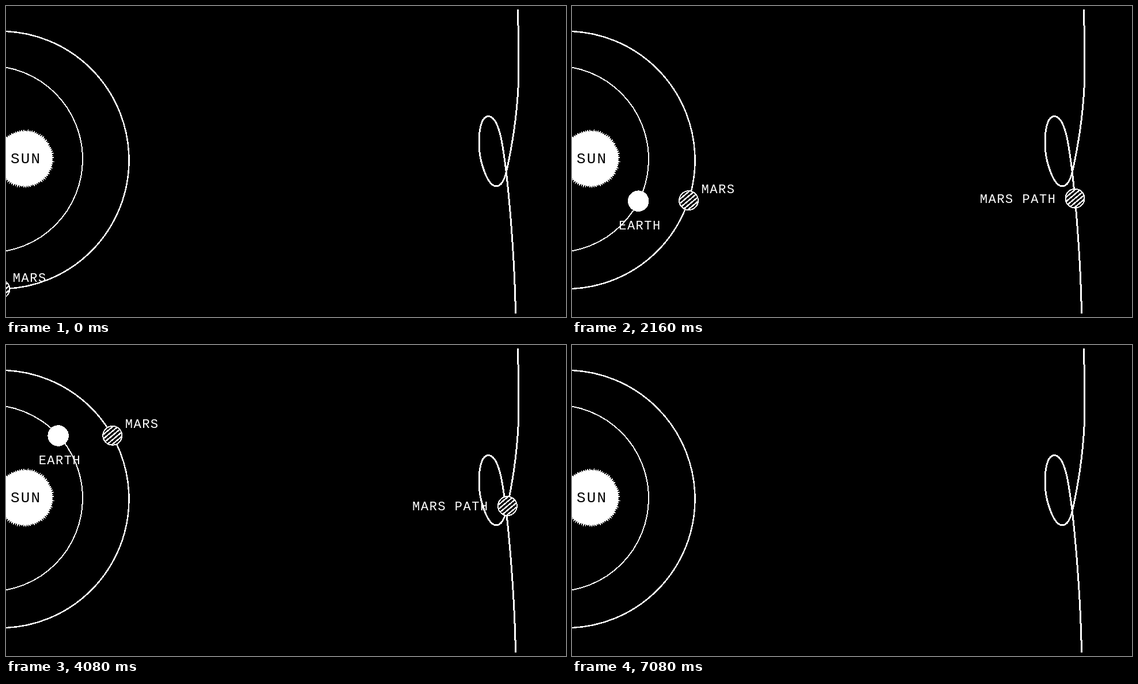
Write an HTML page that moves like this. It is 972 by 540 pixels and loops after 7.32 s.

```html
<!DOCTYPE html>
<html lang="en">
<head>
<meta charset="utf-8">
<title>Retrograde motion</title>
<style>
  html, body { margin: 0; width: 100%; height: 100%; overflow: hidden; background: #000; }
  svg { display: block; width: 972px; height: 540px; shape-rendering: crispEdges; }
  .line { fill: none; stroke: #fff; }
  text { font: 22px "Liberation Mono", monospace; letter-spacing: 1.5px; fill: #fff; }
  .sun-label { font-size: 26px; letter-spacing: 2.2px; fill: #000; }
</style>
</head>
<body>
<svg viewBox="0 0 972 540">
  <defs>
    <g id="hatched">
      <circle r="16.5" fill="#000" stroke="#fff" stroke-width="2"/>
      <path id="hatching" class="line" stroke-width="2.5"/>
    </g>
  </defs>

  <circle class="line" cx="-10.2" cy="267.5" r="223.7" stroke-width="2.5"/>
  <circle class="line" cx="-29" cy="266" r="162" stroke-width="2"/>
  <path id="track" class="line" stroke-width="3" d="M884.5 534 C883.5 470 878 375 868.5 290
    C863 247 857 191.5 837 191.5 C828 191.5 821 206 821 238 C821 270 836 313 851 313
    C858 313 865 306 870 281 C881 230 890 165 890 105 Q890 50 888 6"/>

  <polygon id="sun" fill="#fff"/>
  <text class="sun-label" x="8" y="273">SUN</text>

  <g id="earth">
    <circle r="18.3" fill="#fff"/>
    <text x="-34" y="49">EARTH</text>
  </g>
  <g id="mars">
    <use href="#hatched"/>
    <text x="22" y="-13">MARS</text>
  </g>
  <g id="apparent">
    <use href="#hatched"/>
    <text x="-165" y="7.5">MARS PATH</text>
  </g>
</svg>
<script>
const LOOP = 7320, STEP = 60, LAST = 7080;
const get = id => document.getElementById(id);
const track = get('track');
const trackLength = track.getTotalLength();

// Orbits: centre, radius and [time, angle in degrees] keys
const marsOrbit = {
  cx: -10.2, cy: 267.5, r: 224,
  keys: [[0, 90], [1300, 40], [1440, 36.4], [2880, 0.1], [4080, -29.5], [6240, -81.8], [7020, -108]]
};
const earthOrbit = {
  cx: -29, cy: 266, r: 161.5,
  keys: [[780, 72.4], [1440, 52.1], [2880, 1.4], [3900, -35.2], [4080, -42.2], [5100, -72.4]]
};

// Linear between keys, continuing the outer segments beyond both ends
function interpolate(keys, t) {
  let i = 1;
  while (i < keys.length - 1 && t > keys[i][0]) i++;
  const [t0, a] = keys[i - 1], [t1, b] = keys[i];
  return a + (b - a) * (t - t0) / (t1 - t0);
}

function orbitPoint({ cx, cy, r, keys }, t) {
  const angle = interpolate(keys, t) * Math.PI / 180;
  return { x: cx + r * Math.cos(angle), y: cy + r * Math.sin(angle) };
}

// Constant speed along the track, running straight on past its ends
function trackPoint(t) {
  const s = 76 + (t - 1440) / 3660 * (trackLength - 175);
  if (s < 0) return { x: 884.5, y: 534 - s };
  if (s > trackLength) return { x: 888, y: 6 - (s - trackLength) };
  return track.getPointAtLength(s);
}

function place(id, { x, y }) {
  get(id).setAttribute('transform', `translate(${x.toFixed(2)} ${y.toFixed(2)})`);
}

function drawSun() {
  let seed = 7;
  const random = () => (seed = seed * 16807 % 2147483647) / 2147483647;
  const points = [], spikes = 84;
  for (let i = 0; i < spikes * 2; i++) {
    const angle = i * Math.PI / spikes;
    const r = i % 2 ? 49 + 3 * random() : 47;
    points.push(`${32.8 + r * Math.cos(angle)},${265 + r * Math.sin(angle)}`);
  }
  get('sun').setAttribute('points', points.join(' '));
}

function drawHatching() {
  const tilt = 40 * Math.PI / 180, c = Math.cos(tilt), s = Math.sin(tilt);
  let d = '';
  for (let k = -2; k <= 2; k++) {
    const offset = k * 5.8, half = Math.sqrt(16 * 16 - offset * offset);
    const x = offset * s, y = offset * c;
    d += `M${x - half * c} ${y + half * s}L${x + half * c} ${y - half * s}`;
  }
  get('hatching').setAttribute('d', d);
}

function frame() {
  const time = performance.now() % LOOP;
  const t = Math.min(Math.floor(time / STEP) * STEP, LAST);
  place('earth', orbitPoint(earthOrbit, t));
  place('mars', orbitPoint(marsOrbit, t));
  place('apparent', trackPoint(t));
  requestAnimationFrame(frame);
}

drawSun();
drawHatching();
frame();
</script>
</body>
</html>
```
